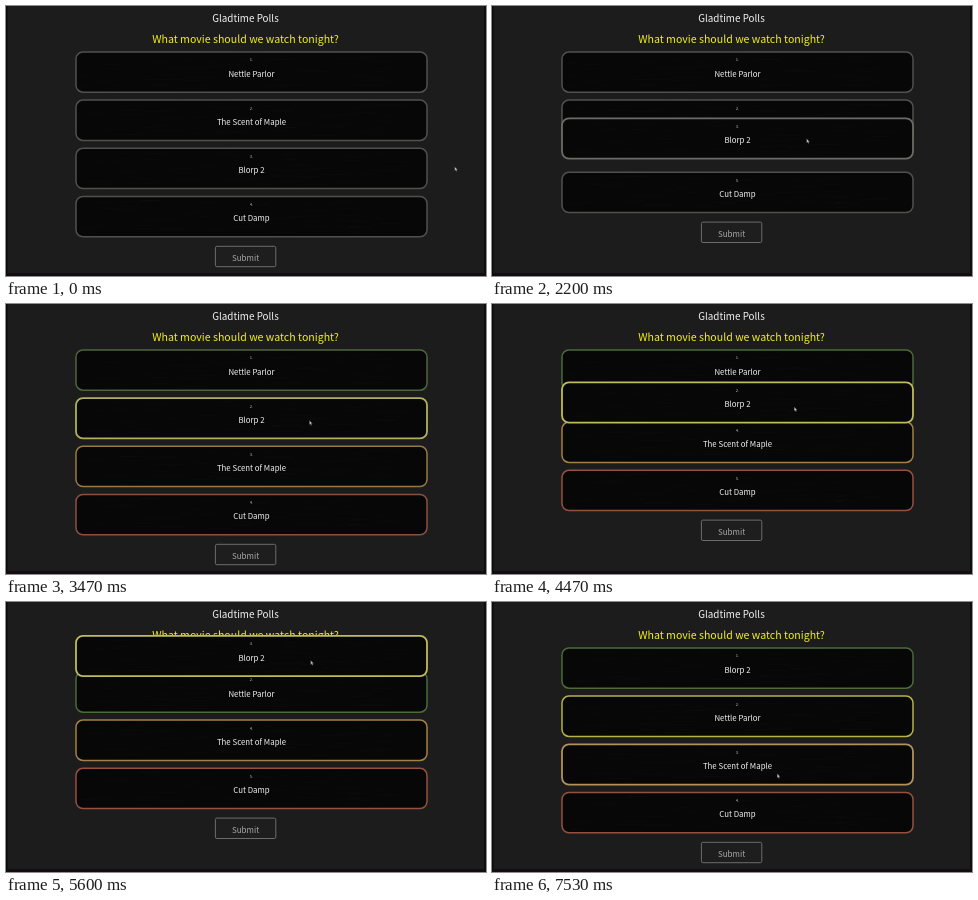
These frames come from a looping animation (480x270 px, 8 s). An HTML page:

```html
<!DOCTYPE html>
<html lang="en">
<head>
<meta charset="utf-8">
<title>Poll</title>
<style>
  html, body { margin: 0; width: 100%; height: 100%; overflow: hidden; background: #1c1c1c; }
  svg { display: block; width: 100vw; height: 100vh; }
  text { font-family: "Noto Sans CJK JP", "Noto Sans CJK SC", "Open Sans", sans-serif; text-anchor: middle; fill: #f4f4f4; }
</style>
</head>
<body>
<svg viewBox="0 0 480 270">
  <rect width="480" height="270" fill="#1c1c1c"/>
  <rect width="1.5" height="270" fill="#0b0b0b"/>
  <rect x="478" width="2" height="270" fill="#0e0e0e"/>
  <rect y="267" width="480" height="3" fill="#130c11"/>
  <text x="239.5" y="15.7" font-size="9.85">Gladtime Polls</text>
  <text x="239.5" y="37" font-size="10.6" style="fill:#f3f01c">What movie should we watch tonight?</text>
  <g id="submit">
    <rect x="209.4" width="60.4" height="20.4" rx="1.5" fill="#1e1e1e" stroke="#6c6c6c"/>
    <text x="239.6" y="14.7" font-size="8" style="fill:#a9a9a9">Submit</text>
  </g>
  <g id="cards"></g>
  <path id="cursor" d="M-1.4-2.5V2L-.4 1.2.3 2.6 1.2 2.2.6.8 1.8.7Z" fill="#ccc" stroke="#111" stroke-width=".5"/>
</svg>
<script>
const LOOP = 8000, FADE = 400;
const TOP = 45.9, PITCH = 48.2, GAP = 24, LEFT = 70, WIDTH = 351, HEIGHT = 40.3;
const GREY = [80, 80, 78], LIGHT = [235, 235, 200];
const RANK = [[76, 106, 58], [180, 178, 72], [164, 128, 66], [150, 80, 62]];
const LABELS = { A: "Nettle Parlor", B: "The Scent of Maple", D: "Cut Damp", C: "Blorp 2" };

// List order from each time on; "_" is the drop slot while C is held.
const PHASES = [
  [0, "ABCD"], [1730, "ABC_D"], [2700, "A_BCD"], [3130, "ACBD"],
  [3950, "AC_BD"], [5220, "_ACBD"], [5800, "CABD"]
];
const isHeld = order => order.includes("_");
const followsHold = (p, i) => i > 0 && isHeld(PHASES[i - 1][1]);
const DROPS = PHASES.filter((p, i) => followsHold(p, i) && !isHeld(p[1]));
const GRABS = PHASES.filter((p, i) => isHeld(p[1]) && !followsHold(p, i));

// Pointer moves: start, end, x, y reached.
const MOVES = [
  [0, 1, 450, 163], [470, 1130, 319, 165], [1730, 2530, 314, 115.8], [2600, 2930, 311, 99.5],
  [3130, 3530, 304, 121], [3950, 4470, 303.5, 105.2], [4530, 5330, 306, 60.7],
  [6270, 7000, 286, 206], [7270, 7530, 286.5, 174]
];

const $ = id => document.getElementById(id);
const clamp = u => Math.max(0, Math.min(1, u));
const mix = (a, b, u) => a + (b - a) * u;
const blend = (a, b, u) => a.map((v, i) => mix(v, b[i], u));
const ease = u => (u + u * u * (3 - 2 * u)) / 2;
const latest = (list, t) => list.filter(p => p[0] <= t).pop();

function make(parent, tag, attrs, text = "") {
  const el = document.createElementNS("http://www.w3.org/2000/svg", tag);
  for (const key in attrs) el.setAttribute(key, attrs[key]);
  el.textContent = text;
  return parent.appendChild(el);
}

function pointerAt(t) {
  return MOVES.reduce((pos, [start, end, x, y]) =>
    blend(pos, [x, y], ease(clamp((t - start) / (end - start)))), MOVES[0].slice(2));
}

let seed = 7;
const random = () => (seed = seed * 16807 % 2147483647) / 2147483647;

function grain() {
  const streak = () => `M${74 + random() * 310} ${3 + random() * 34}h${6 + random() * 26}`;
  return Array.from({ length: 60 }, streak).join("");
}

// C comes last so that it lies over the others.
const cards = Object.entries(LABELS).map(([id, label]) => {
  const g = make($("cards"), "g", {});
  const box = make(g, "rect", { x: LEFT, width: WIDTH, height: HEIGHT, rx: 7, fill: "#070707" });
  make(g, "path", { d: grain(), stroke: "#fff", "stroke-opacity": .018, "stroke-width": .8 });
  const num = make(g, "text", { x: 245.4, y: 9.6, "font-size": 3.3 });
  make(g, "text", { x: 245.5, y: 24.8, "font-size": 7.85 }, label);
  return { id, g, box, num };
});

// Tops of all cards by id, plus the end of the list.
function layout(order) {
  const tops = {};
  let end = TOP;
  for (const id of order) {
    if (id === "C" && isHeld(order)) continue;
    tops[id] = end;
    end += id === "_" ? GAP : PITCH;
  }
  return { tops, end };
}

function heldTop(t, pointer) {
  const grab = latest(GRABS, t)[0];
  const before = latest(PHASES, grab - 1)[1];
  return layout(before).tops.C + pointer[1] - pointerAt(grab)[1];
}

function borderColor(id, t) {
  return DROPS.reduce((color, [start, order]) =>
    blend(color, RANK[order.indexOf(id)], clamp((t - start) / FADE)), GREY);
}

function hoverLevel(top, [x, y]) {
  const depth = Math.min(x - LEFT, LEFT + WIDTH - x, y - top, top + HEIGHT - y);
  return clamp(depth / 5);
}

function draw(t) {
  const order = latest(PHASES, t)[1];
  const held = isHeld(order);
  const pointer = pointerAt(t);
  const { tops, end } = layout(order);
  if (held) tops.C = heldTop(t, pointer);

  for (const { id, g, box, num } of cards) {
    const hover = held && id !== "C" ? 0 : hoverLevel(tops[id], pointer);
    const color = blend(borderColor(id, t), LIGHT, hover * .18);
    g.setAttribute("transform", `translate(0 ${tops[id].toFixed(2)})`);
    box.setAttribute("stroke", `rgb(${color.map(Math.round)})`);
    box.setAttribute("stroke-width", mix(1.5, 1.8, hover));
    num.textContent = order.indexOf(id) + 1 + ".";
  }
  $("submit").setAttribute("transform", `translate(0 ${(end + 1.6).toFixed(2)})`);
  $("cursor").setAttribute("transform", `translate(${pointer})`);
}

function tick() {
  draw(performance.now() % LOOP);
  requestAnimationFrame(tick);
}
tick();
</script>
</body>
</html>
```
